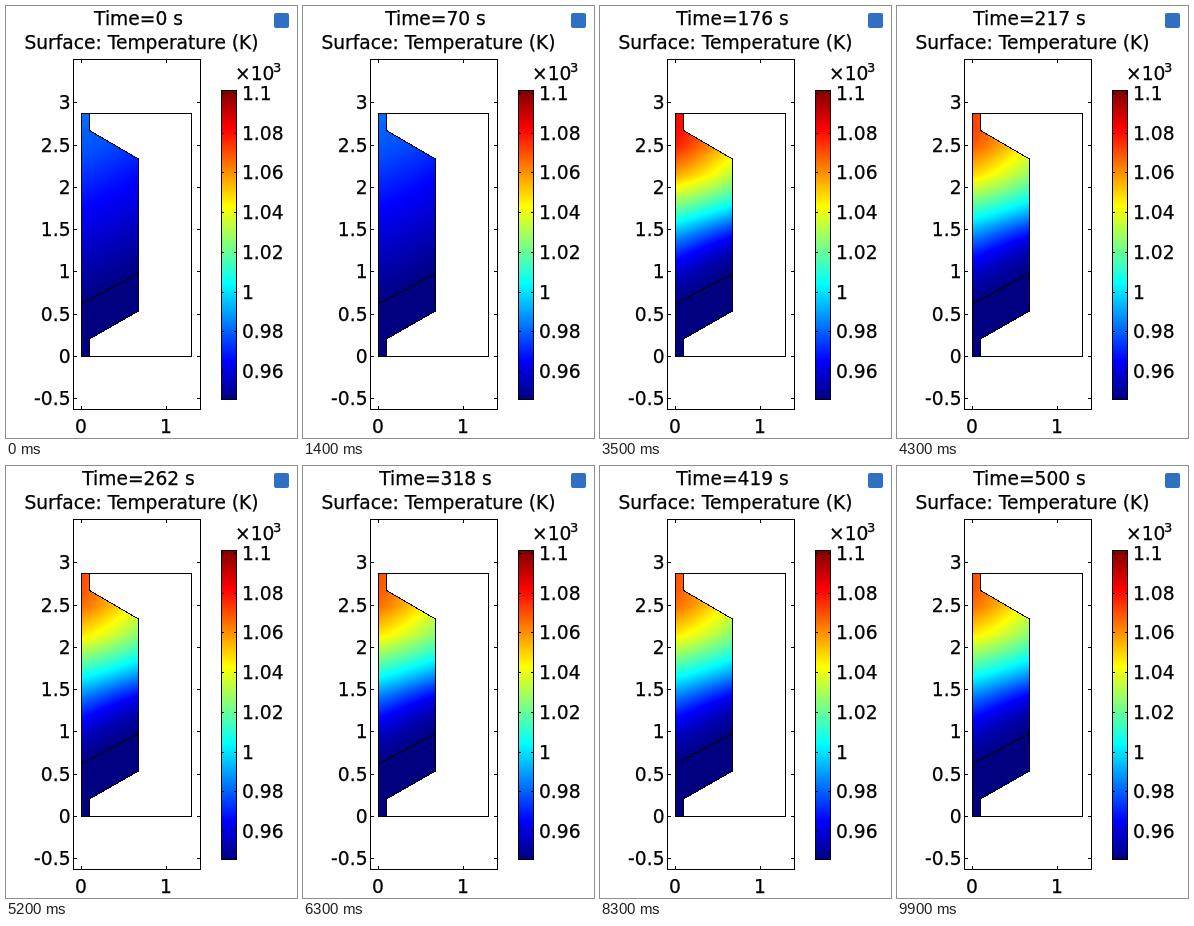
An HTML page with a canvas for the animation above (10000 ms loop, 291 px wide and 432 px high).

```html
<!DOCTYPE html>
<html lang="en">
<head>
<meta charset="utf-8">
<title>Surface temperature</title>
<style>
  html, body { margin: 0; width: 100%; height: 100%; overflow: hidden; background: #fff; }
  canvas, svg { position: absolute; left: 0; top: 0; }
  canvas {
    left: 75px; top: 107px;
    clip-path: polygon(0 0, 8px 0, 8px 17px, 58px 46px, 58px 198px, 8px 226px, 8px 243px, 0 243px);
  }
  text { font: 18.67px "DejaVu Sans", sans-serif; stroke: #000; stroke-width: .25px; }
  .line { fill: none; stroke: #000; shape-rendering: crispEdges; }
</style>
</head>
<body>
<canvas id="field" width="58" height="243"></canvas>
<svg width="291" height="432" viewBox="0 0 291 432">
  <defs>
    <linearGradient id="jet" x1="0" y1="1" x2="0" y2="0">
      <stop offset="0" stop-color="#000080"/>
      <stop offset=".125" stop-color="#00f"/>
      <stop offset=".375" stop-color="#0ff"/>
      <stop offset=".625" stop-color="#ff0"/>
      <stop offset=".875" stop-color="#f00"/>
      <stop offset="1" stop-color="#800000"/>
    </linearGradient>
  </defs>
  <text id="clock" x="132.5" y="19" text-anchor="middle"></text>
  <text x="135.5" y="43" text-anchor="middle">Surface: Temperature (K)</text>
  <rect x="268" y="7" width="15" height="15" rx="2" fill="#2f6fc4"/>
  <text x="229" y="74">×10</text>
  <text x="267" y="66" style="font-size:13px">3</text>
  <rect x="215.5" y="84.5" width="15" height="309" fill="url(#jet)"/>
  <g class="line">
    <rect x="67.5" y="53.5" width="127" height="350"/>
    <rect x="75.5" y="107.5" width="110" height="243"/>
    <path d="M75.5 107.5H83.5V124.5L132.5 153V305L83.5 333V350.5H75.5ZM75.5 298L132.5 267.5"/>
    <rect x="215.5" y="84.5" width="15" height="309"/>
    <path id="ticks"/>
  </g>
  <g id="labels"></g>
</svg>
<script>
const LOOP = 10000, STEP = 100, END_TIME = 500, LAST = LOOP / STEP - 1;
const WIDTH = 58, HEIGHT = 243, TOP = 107, JUMP = 150, INLET_RISE = 31;

// [height on stage, share of the colour range] along the left edge
const coldProfile = [[107, .235], [150, .2], [195, .135], [250, .06], [298, 0], [390, 0]];
const hotProfile = [[107, .8], [125, .79], [140, .765], [168, .645], [190, .505], [210, .38],
                    [232, .235], [250, .135], [272, .055], [298, 0], [390, 0]];

const clock = document.getElementById('clock');
const ctx = document.getElementById('field').getContext('2d');
const image = ctx.createImageData(WIDTH, HEIGHT);
const clamp = v => Math.max(0, Math.min(1, v));
const smooth = v => v * v * (3 - 2 * v);

function sample(profile, y) {
  let i = 1;
  while (i < profile.length - 1 && profile[i][0] < y) i++;
  const [y0, v0] = profile[i - 1], [y1, v1] = profile[i];
  return v0 + (v1 - v0) * (y - y0) / (y1 - y0);
}

function jet(u) {
  const channel = centre => 255 * clamp(1.5 - Math.abs(4 * u - centre));
  return [channel(3), channel(2), channel(1)];
}

// Heating after the jump: quick rise, overshoot, settling.
function heating(seconds) {
  const d = Math.max(0, seconds - JUMP);
  return (1 - Math.exp(-d / 8)) * (1 + .53 * Math.exp(-d / 25));
}

function drawField(heat) {
  for (let row = 0, p = 0; row < HEIGHT; row++) {
    const y = TOP + row;
    const tilt = INLET_RISE * smooth(clamp((y - 180) / 90));
    for (let x = 0; x < WIDTH; x++, p += 4) {
      const bend = (x / WIDTH) ** 1.2;
      const cold = sample(coldProfile, y + INLET_RISE * bend);
      const hot = sample(hotProfile, y + tilt * bend) * (1 - .22 * bend);
      image.data.set(jet(clamp(cold + (hot - cold) * heat)), p);
      image.data[p + 3] = 255;
    }
  }
  ctx.putImageData(image, 0, 0);
}

function buildScales() {
  const labels = document.getElementById('labels');
  let path = '';
  const label = (value, x, y, anchor) => {
    const text = document.createElementNS('http://www.w3.org/2000/svg', 'text');
    text.setAttribute('x', x);
    text.setAttribute('y', y);
    text.setAttribute('text-anchor', anchor);
    text.textContent = value;
    labels.append(text);
  };
  for (let v = -.5; v <= 3; v += .5) {
    const y = Math.round(350 - 84.6 * v);
    label(v, 64.5, y + 7, 'end');
    path += `M67 ${y + .5}h4M195 ${y + .5}h-4`;
  }
  for (const v of [0, 1]) {
    const x = Math.round(75 + 84.6 * v);
    label(v, x, 427, 'middle');
    path += `M${x + .5} 404v-4M${x + .5} 53v4`;
  }
  for (let i = 0; i < 8; i++) {
    const y = Math.round(87 + 39.7 * i);
    label(+(1.1 - .02 * i).toFixed(2), 236, y + 7, 'start');
    path += `M215 ${y + .5}h3M231 ${y + .5}h-3`;
  }
  document.getElementById('ticks').setAttribute('d', path);
}

let shown = -1;
function render(ms) {
  const step = Math.floor((ms % LOOP) / STEP);
  if (step === shown) return;
  shown = step;
  const seconds = END_TIME * step / LAST;
  clock.textContent = `Time=${Math.floor(seconds)} s`;
  drawField(heating(seconds));
}

buildScales();
const start = performance.now();
function tick() {
  render(performance.now() - start);
  requestAnimationFrame(tick);
}
tick();
</script>
</body>
</html>
```
